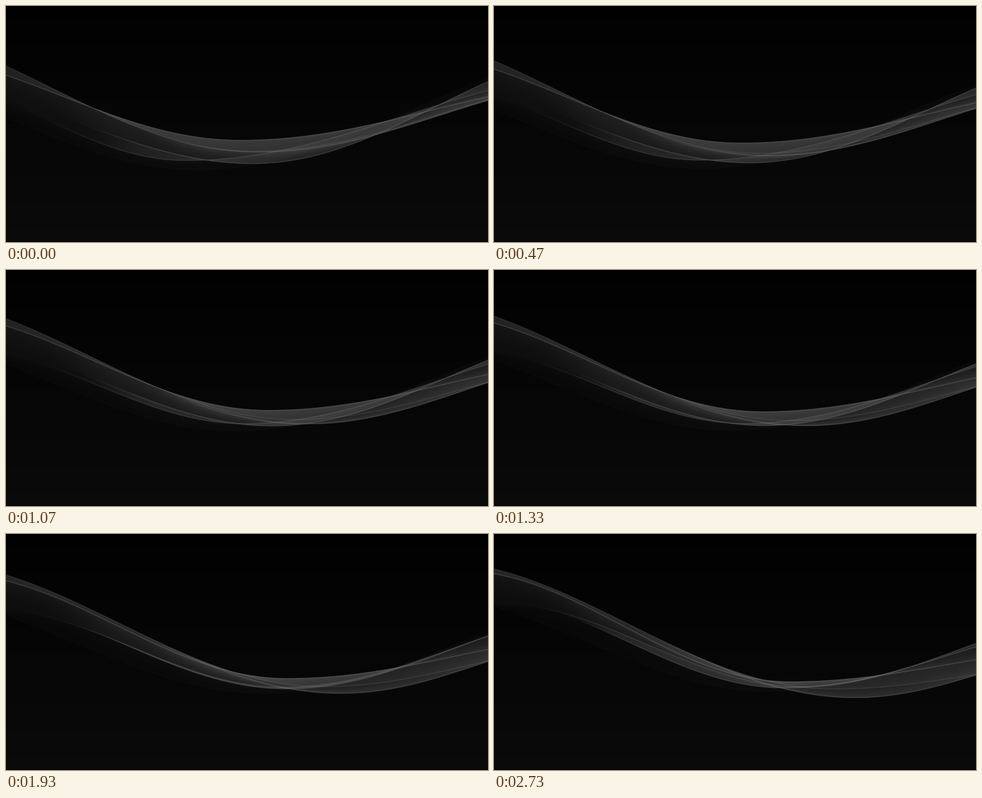
An HTML page with a canvas for the animation above (2790 ms loop, 782 by 385 pixels).

```html
<!DOCTYPE html>
<html lang="en">
<head>
<meta charset="utf-8">
<title>Silk ribbon</title>
<style>
  html, body { margin: 0; width: 100%; height: 100%; overflow: hidden; background: #000; }
  canvas { display: block; width: 782px; height: 385px; }
</style>
</head>
<body>
<canvas id="stage" width="782" height="385"></canvas>
<script>
const W = 782, H = 385, LOOP = 2790, STEP = 200 / 3, LAST = 41;
const RIGHT_CREST = 1000, CREST_DRIFT = 140;
const ctx = document.getElementById('stage').getContext('2d');
const image = ctx.createImageData(W, H);
const column = new Float32Array(H);

// Each strand is a wave with one trough, drifting between two poses.
const pose = (left, troughX, troughY, right) => ({ left, troughX, troughY, right });
const strand = (crest, from, to) => ({ crest, from, to });
const a = strand(-110, pose(98, 400, 237, 153), pose(57, 550, 253, 229));
const b = strand(-60, pose(113, 380, 219, 148), pose(65, 480, 241, 205));
const c = strand(0, pose(158, 290, 252, 138), pose(113, 500, 249, 178));
const d = strand(-150, pose(182, 310, 267, 117), pose(118, 450, 257, 180));
const e = strand(-30, pose(150, 400, 257, 123), pose(105, 470, 251, 184));
const f = strand(-90, pose(118, 410, 238, 154), pose(66, 585, 267, 230));
const strands = [a, b, c, d, e, f];

// Translucent sheets are lit from the first edge towards the second.
const sheet = (one, two, near, far, start = -W) => ({ one, two, near, far, start });
const sheets = [
  sheet(a, b, 20, 20), sheet(b, c, 16, 8), sheet(c, d, 5, 2),
  sheet(b, e, 8, 7, 60), sheet(f, e, 20, 3, 200),
  sheet(c, e, 13, 13, 110), sheet(a, f, 12, 12, 200)
];

const rim = (edge, light, start = -W) => ({ edge, light, start });
const rims = [rim(a, 28), rim(b, 48), rim(c, 32, 40), rim(d, 3), rim(e, 48, 110), rim(f, 46, 250)];

const clamp = (v, lo, hi) => Math.min(hi, Math.max(lo, v));
const mix = (from, to, k) => from + (to - from) * k;
const swell = u => 1 - Math.cos(Math.PI * u);
const fadeIn = (x, start) => swell(clamp((x - start) / 140, 0, 1)) / 2;

function setPose(line, p) {
  const { from, to } = line;
  const eased = p + 0.25 * p * (1 - p);
  const at = key => mix(from[key], to[key], key === 'right' ? p : eased);
  const troughX = at('troughX'), troughY = at('troughY');
  const slope = (end, endY, crest) => x =>
    mix(troughY, endY, swell((x - troughX) / crest) / swell((end - troughX) / crest));
  const left = slope(0, at('left'), troughX - line.crest + CREST_DRIFT * (1 - eased));
  const right = slope(W, at('right'), RIGHT_CREST - troughX);
  line.height = x => x < troughX ? left(x) : right(x);
}

function addSheet(y1, y2, near, far) {
  const top = Math.min(y1, y2), bottom = Math.max(y1, y2);
  const shine = 1 + 12 / (bottom - top + 5);
  for (let y = Math.floor(top); y <= bottom; y++) {
    const cover = Math.min(y + 1, bottom) - Math.max(y, top);
    const u = clamp((y + 0.5 - y1) / (y2 - y1 || 1), 0, 1);
    column[y] += cover * shine * mix(far, near, (1 - u) ** 2);
  }
}

function addRim(centre, light) {
  for (let y = Math.floor(centre) - 2; y <= centre + 2; y++) {
    column[y] += light * Math.max(0, 1 - Math.abs(y + 0.5 - centre) / 1.3);
  }
}

function draw(p) {
  strands.forEach(line => setPose(line, p));
  for (let x = 0; x < W; x++) {
    column.fill(0);
    for (const { one, two, near, far, start } of sheets) {
      const k = fadeIn(x, start);
      if (k) addSheet(one.height(x), two.height(x), near * k, far * k);
    }
    for (const { edge, light, start } of rims) {
      addRim(edge.height(x), light * fadeIn(x, start));
    }
    for (let y = 0; y < H; y++) {
      const backdrop = y === H - 1 ? 0 : 1 + 9 * y / H;
      const grey = Math.round(backdrop + 150 * (1 - Math.exp(-column[y] / 150)));
      const i = 4 * (y * W + x);
      image.data[i] = image.data[i + 1] = image.data[i + 2] = grey;
      image.data[i + 3] = 255;
    }
  }
  ctx.putImageData(image, 0, 0);
}

const begin = performance.now();
let shown = -1;
function tick() {
  const time = (performance.now() - begin) % LOOP;
  const step = Math.min(LAST, Math.floor((time + 3.5) / STEP));
  if (step !== shown) draw((shown = step) / LAST);
  requestAnimationFrame(tick);
}
tick();
</script>
</body>
</html>
```
